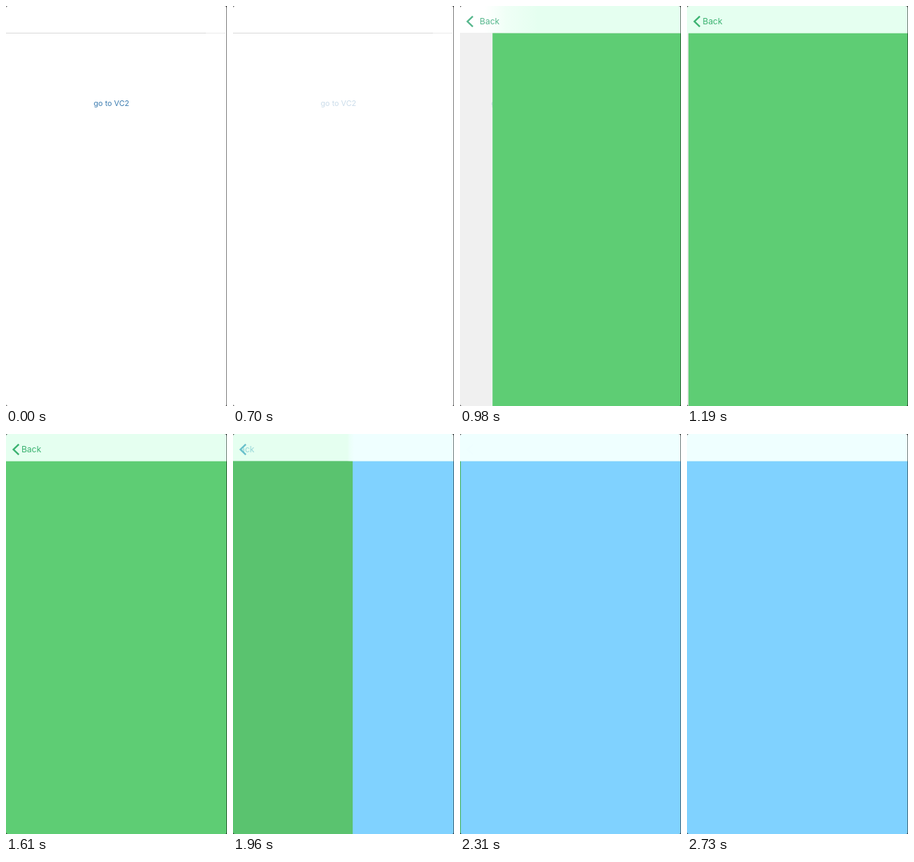
An HTML page with a canvas that plays this animation: 314 px wide and 568 px high, repeating every 3220 ms.

```html
<!DOCTYPE html>
<html lang="en">
<head>
<meta charset="utf-8">
<title>Navigation push</title>
<style>
  html, body { margin: 0; width: 100%; height: 100%; overflow: hidden; background: #fff; }
  canvas { display: block; width: 314px; height: 568px; }
</style>
</head>
<body>
<canvas id="stage" width="314" height="568"></canvas>
<script>
const W = 314, H = 568, BAR = 38.4;
const LOOP = 3220, STEP = 70;
const ctx = document.getElementById('stage').getContext('2d');

const WHITE = [255, 255, 255];
const PAGES = [
  { body: WHITE, bar: WHITE, tint: [60, 124, 176] },
  { body: [94, 205, 116], bar: [229, 255, 240], tint: [58, 178, 112] },
  { body: [128, 210, 255], bar: [239, 255, 255], tint: [76, 174, 232] }
];
const PUSHES = [
  { start: 787, dim: 0.07, blur: [-11, 65] },
  { start: 1872, dim: 0.1, blur: [-8, 2] }
];

const rgb = (c, a = 1) => `rgba(${c.map(Math.round).join(',')},${a})`;
const mix = (a, b, k) => a.map((v, i) => v + (b[i] - v) * k);
const clamp = v => Math.max(0, Math.min(1, v));

function rect(x, y, w, h, fill) {
  ctx.fillStyle = fill;
  ctx.fillRect(x, y, w, h);
}

function text(str, x, y, size, color, alpha) {
  ctx.font = `${size}px Inter, sans-serif`;
  ctx.fillStyle = rgb(color, alpha);
  ctx.fillText(str, x, y);
}

// Critically damped spring, 0 to 1.
function spring(ms) {
  if (ms <= 0) return 0;
  const u = ms * 0.0176;
  return 1 - (1 + u) * Math.exp(-u);
}

function drawBackButton(backX, textAlpha, arrowAlpha, color) {
  if (arrowAlpha <= 0) return;
  ctx.save();
  ctx.beginPath();
  ctx.moveTo(W, 0);
  ctx.lineTo(19, 14);
  ctx.lineTo(12, 22);
  ctx.lineTo(19, 30);
  ctx.lineTo(W, BAR);
  ctx.clip();
  text('Back', backX, 26.4, 12, color, textAlpha);
  ctx.restore();

  ctx.strokeStyle = rgb(color, arrowAlpha);
  ctx.lineWidth = 2.4;
  ctx.beginPath();
  ctx.moveTo(18.2, 14.7);
  ctx.lineTo(10.6, 22);
  ctx.lineTo(18.2, 29.3);
  ctx.stroke();
}

function drawBar(from, to, edge, blur) {
  rect(0, 0, W, BAR, rgb(from.bar));
  if (edge >= W) return;
  const x0 = edge + blur[0], x1 = edge + blur[1];
  const k = clamp(edge / 20);
  const fade = ctx.createLinearGradient(x0 * k - (1 - k) * 90, 0, x1 * k, 0);
  fade.addColorStop(0, rgb(to.bar, 0));
  fade.addColorStop(0.4, rgb(to.bar, 0.6));
  fade.addColorStop(1, rgb(to.bar));
  rect(0, 0, W, BAR, fade);
}

function drawFrame(t) {
  const second = t >= PUSHES[1].start;
  const index = second ? 1 : 0;
  const push = PUSHES[index];
  const from = PAGES[index], to = PAGES[index + 1];
  const p = spring(t - push.start);
  const edge = W * (1 - p);
  const tint = mix(from.tint, to.tint, second ? Math.sqrt(p) : p);

  rect(0, 0, W, H, rgb(from.body));
  if (!second) {
    text('go to VC2', 124.5 - 0.3 * W * p, 142, 10.8, from.tint, t < 700 ? 1 : 0.27);
  }
  rect(0, 0, W, H, `rgba(0,0,0,${push.dim * p})`);
  if (!second && p > 0) rect(edge - 3, BAR, 3, H, rgb(to.bar, 1 - p));
  rect(edge, 0, W, H, rgb(to.body));

  drawBar(from, to, edge, push.blur);
  if (!second) {
    rect(0, 38, 284, 1, `rgba(0,0,0,${0.15 * (1 - p)})`);
    rect(284, 38, 28, 1, `rgba(0,0,0,${(p > 0 ? 0.15 : 0.08) * (1 - p)})`);
    drawBackButton(22 + 41 * (1 - p), p, p, tint);
  } else {
    drawBackButton(22 - 43 * p, clamp(1 - 1.1 * p), 1 - p * p, tint);
  }

  drawWindowEdge();
}

function drawWindowEdge() {
  rect(313, 0, 1, H, 'rgba(0,0,0,0.5)');
  ctx.fillStyle = 'rgba(30,30,30,0.85)';
  ctx.beginPath();
  ctx.rect(0, 0, W, H);
  ctx.roundRect(0, 0, W, H, [3, 4, 3, 3]);
  ctx.fill('evenodd');
}

function tick() {
  const t = performance.now() % LOOP;
  drawFrame(Math.floor(t / STEP) * STEP);
  requestAnimationFrame(tick);
}
tick();
</script>
</body>
</html>
```
